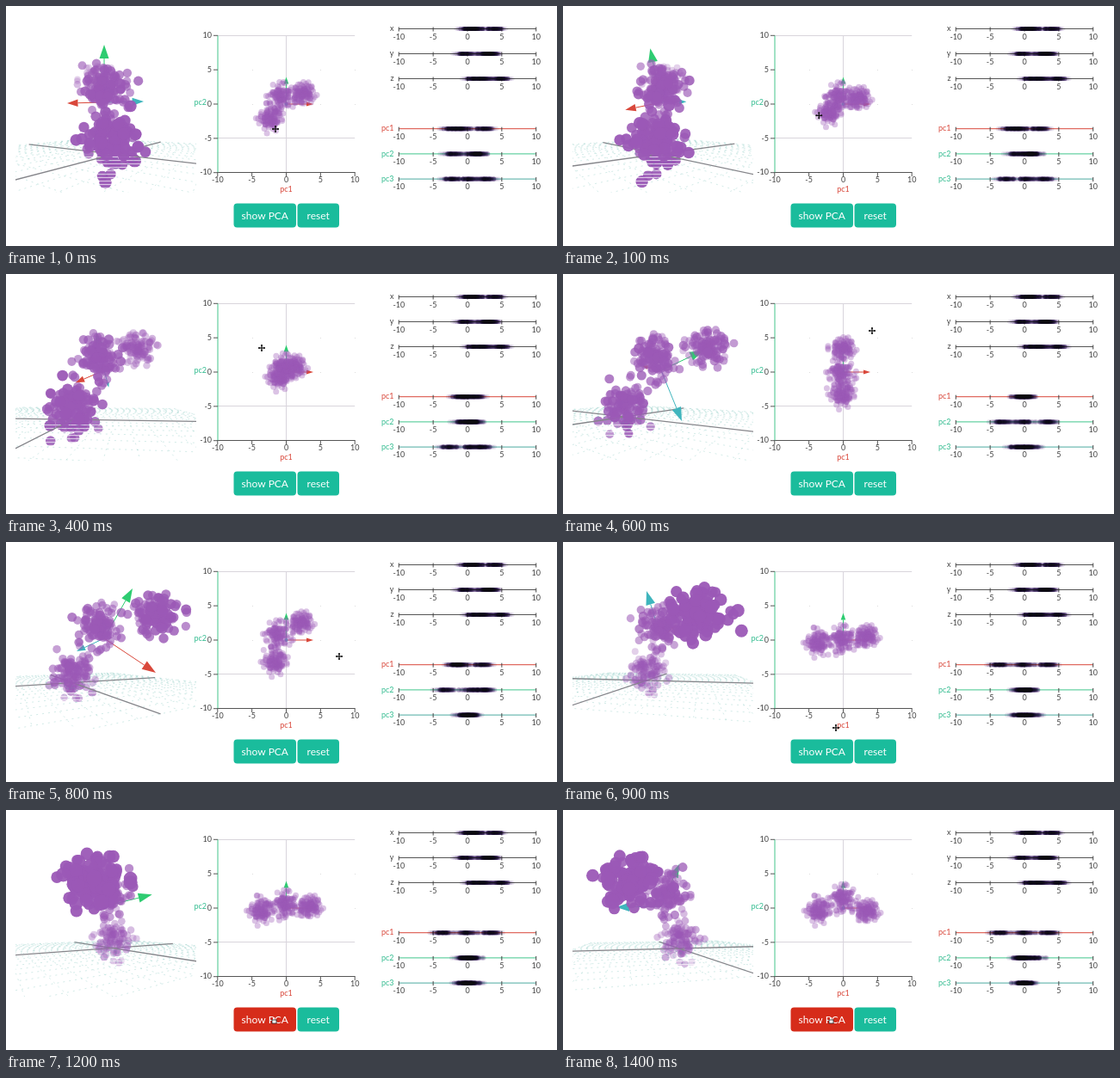
Animation of 640x279 px, one loop 1500 ms. Source, as an HTML page with a canvas:

```html
<!DOCTYPE html>
<html lang="en">
<head>
<meta charset="utf-8">
<title>Principal components</title>
<style>
  html, body { margin: 0; width: 640px; height: 279px; overflow: hidden; background: #fff; }
  canvas { display: block; }
</style>
</head>
<body>
<canvas id="stage" width="640" height="279"></canvas>
<script>
const ctx = document.getElementById('stage').getContext('2d');
const FONT = 'Lato, sans-serif';
const PURPLE = '155,89,182', DARK = '#444', GREEN = '#2ecc71', RED = '#d9483b', TEAL = '#3fb5bd';
const LOOP = 1500, STEP = 100, UNIT = 7.97, RAD = Math.PI / 180;
const CAMERA = 190, ORBIT_X = 116, HORIZON = 140, FLOOR = 25;

// Each pose: orbit angle, cursor, cluster centres (pc1, pc2, pc3), arrow tips (green, red, teal).
const poses = [
  { t: 0, turn: [-10], cursor: [313, 143], pc: [-2.2, -2.1, -2.2, -.7, 1, .2, 2.5, 1.5, 2.8],
    tips: [114, 45, 71, 113, 160, 111] },
  { t: 300, turn: [36], cursor: [266, 96], pc: [-1.3, .6, -3.4, -.2, .9, .3, 1.8, -.6, 3.3],
    tips: [76, 58, 75, 136, 110, 112] },
  { t: 600, turn: [80], cursor: [359, 66], pc: [0, -3.3, -1, -.3, -.2, .8, 0, 3.4, 0],
    tips: [163, 89, 92, 107, 138, 171] },
  { t: 800, turn: [106], cursor: [387, 133], pc: [-1.5, -3.2, .2, -1.2, .7, -.3, 2.2, 2.5, .4],
    tips: [147, 54, 174, 152, 82, 127] },
  { t: 900, turn: [148], cursor: [317, 216], pc: [-3.6, -.4, -.6, -.1, 0, .9, 3.4, .5, 0],
    tips: [125, 112, 132, 96, 97, 57] },
  { t: 1100, turn: [182], cursor: [311, 245], pc: [-3.6, -.4, -.6, -.1, 0, .9, 3.4, .5, 0],
    tips: [187, 116, 114, 100, 114, 112] },
  { t: 1400, turn: [212], cursor: [311, 245], pc: [-3.5, -.4, 0, 0, 1.3, 0, 3.5, -.5, 0],
    tips: [135, 63, 112, 104, 62, 113] }
];

// arm: signed distance from the orbit axis; xyz: centre on the fixed strips.
const clusters = [
  { arm: -43, y: 152, slope: .07, size: 13, xyz: [.2, -.4, 1] },
  { arm: -8, y: 97, slope: 0, size: 11, xyz: [1.4, 2.5, 2.4] },
  { arm: 55, y: 84, slope: -.04, size: 12.5, xyz: [4, 3.4, 4.9] }
];

let seed = 71;
function random() {
  seed = (seed * 16807) % 2147483647;
  return seed / 2147483647;
}
function gauss() {
  const g = Math.sqrt(-2 * Math.log(random())) * Math.cos(2 * Math.PI * random());
  return Math.max(-2.6, Math.min(2.6, g));
}
const points = [];
for (let i = 0; i < 330; i++) {
  points.push({ c: i % 3, off: [gauss(), gauss(), gauss()] });
}

function poseAt(t) {
  let i = 0;
  while (i < poses.length - 2 && poses[i + 1].t < t) i++;
  const a = poses[i], b = poses[i + 1], k = (t - a.t) / (b.t - a.t);
  const mix = name => a[name].map((v, j) => v + (b[name][j] - v) * k);
  return { turn: mix('turn')[0] * RAD, cursor: mix('cursor'), pc: mix('pc'), tips: mix('tips') };
}

function line(x1, y1, x2, y2, color, width = 1) {
  ctx.strokeStyle = color;
  ctx.lineWidth = width;
  ctx.beginPath();
  ctx.moveTo(x1, y1);
  ctx.lineTo(x2, y2);
  ctx.stroke();
}
function disc(x, y, r) {
  ctx.beginPath();
  ctx.arc(x, y, r, 0, 2 * Math.PI);
  ctx.fill();
}
function text(str, x, y, color, align = 'center', size = 9) {
  ctx.font = `${size}px ${FONT}`;
  ctx.textAlign = align;
  ctx.textBaseline = 'middle';
  ctx.fillStyle = color;
  ctx.fillText(str, x, y);
}
function arrow(x1, y1, x2, y2, color, head, half) {
  const len = Math.hypot(x2 - x1, y2 - y1);
  if (len < 3) return;
  const ux = (x2 - x1) / len, uy = (y2 - y1) / len;
  const bx = x2 - ux * head, by = y2 - uy * head;
  line(x1, y1, bx, by, color);
  ctx.fillStyle = color;
  ctx.beginPath();
  ctx.moveTo(x2, y2);
  ctx.lineTo(bx - uy * half, by + ux * half);
  ctx.lineTo(bx + uy * half, by - ux * half);
  ctx.fill();
}

function floorLine(x1, z1, x2, z2, color, width, dash) {
  // Keep both ends in front of the camera.
  const near = 140;
  if (z1 > near && z2 > near) return;
  if (z1 > z2) [x1, z1, x2, z2] = [x2, z2, x1, z1];
  if (z2 > near) {
    x2 = x1 + (x2 - x1) * (near - z1) / (z2 - z1);
    z2 = near;
  }
  const s1 = CAMERA / (CAMERA - z1), s2 = CAMERA / (CAMERA - z2);
  ctx.setLineDash(dash);
  line(ORBIT_X + x1 * s1, HORIZON + FLOOR * s1, ORBIT_X + x2 * s2, HORIZON + FLOOR * s2, color, width);
  ctx.setLineDash([]);
}

function drawFloor(turn) {
  const ox = -43 * Math.sin(turn), oz = 43 * Math.cos(turn), reach = 140;
  for (let side = 0; side < 2; side++) {
    const a = turn + 45 * RAD + side * Math.PI / 2;
    const ux = Math.cos(a), uz = Math.sin(a);
    for (let i = -10; i <= 10; i++) {
      const cx = ox - uz * i * 14, cz = oz + ux * i * 14;
      const ends = [cx - ux * reach, cz - uz * reach, cx + ux * reach, cz + uz * reach];
      if (i) floorLine(...ends, 'rgba(80,175,165,.36)', .7, [2, 5]);
      else floorLine(...ends, '#85858a', 1.3, []);
    }
  }
}

function drawScene(pose) {
  const sin = Math.sin(pose.turn), cos = Math.cos(pose.turn);
  const balls = points.map(({ c, off }) => {
    const k = clusters[c];
    const cz = -k.arm * cos;
    const x = k.arm * sin + k.size * (off[0] * cos - off[2] * sin);
    const z = cz + k.size * (off[0] * sin + off[2] * cos);
    const s = CAMERA / (CAMERA - z);
    return { x: ORBIT_X + x * s, y: k.y + k.slope * cz + off[1] * k.size * s, z, s,
      below: k.y + k.slope * cz + off[1] * k.size * s > HORIZON + FLOOR * s };
  }).sort((a, b) => a.z - b.z);
  const paint = below => {
    for (const b of balls) {
      if (b.below !== below) continue;
      const alpha = Math.max(.27, Math.min(.95, .62 + b.z / 130));
      ctx.fillStyle = `rgba(${PURPLE},${alpha})`;
      disc(b.x, b.y, 4.9 * b.s);
    }
  };

  ctx.save();
  ctx.beginPath();
  ctx.rect(11, 20, 210, 197);
  ctx.clip();
  paint(true);
  for (let y = 175.5; y < 217; y += 4) line(11, y, 221, y, 'rgba(255,255,255,.65)');
  drawFloor(pose.turn);
  [GREEN, RED, TEAL].forEach((color, i) => {
    const x = pose.tips[2 * i], y = pose.tips[2 * i + 1];
    const k = Math.min(1, Math.hypot(x - 114, y - 112) / 55);
    arrow(114, 112, x, y, color, 16 * k, 5.5 * k);
  });
  paint(false);
  ctx.restore();
}

function drawChart(pose) {
  const cx = 325.5, cy = 114, half = 10 * UNIT;
  const left = cx - half, right = cx + half, top = cy - half, bottom = cy + half;
  line(left, 34.5, right, 34.5, '#d9d5dc');
  line(left, 153.5, right, 153.5, '#d9d5dc');
  line(cx, top, cx, bottom, '#d9d5dc');
  ctx.fillStyle = '#ddd';
  for (const x of [-5, 5, 10]) {
    for (const y of [0, 5]) ctx.fillRect(Math.round(cx + x * UNIT), Math.round(cy - y * UNIT), 1, 1);
  }
  line(left, 193.5, right, 193.5, '#555');
  line(246, top, 246, bottom, '#45c58a');
  for (let v = -10; v <= 10; v += 5) {
    const x = cx + v * UNIT, y = cy - v * UNIT;
    line(x, 193, x, 198, '#555');
    line(241, y, 246, y, '#555');
    text(v, x, 202.5, DARK);
    text(v, 239, y, DARK, 'right');
  }
  text('pc1', cx, 213, RED);
  text('pc2', 233, 112, '#35bd91', 'right');

  arrow(cx, cy, 357, cy, RED, 8, 2.5);
  arrow(cx, cy, cx, 82.5, GREEN, 8, 2.8);
  ctx.fillStyle = TEAL;
  disc(cx, cy, 2);
  ctx.fillStyle = `rgba(${PURPLE},.36)`;
  for (const { c, off } of points) {
    const x = pose.pc[3 * c] + off[0] * .85, y = pose.pc[3 * c + 1] + off[1] * .85;
    disc(cx + x * UNIT, cy - y * UNIT, 3.5);
  }
}

function drawStrip(label, y, lineColor, textColor, valueOf) {
  const cx = 536;
  line(cx - 10 * UNIT, y, cx + 10 * UNIT, y, lineColor);
  for (let v = -10; v <= 10; v += 5) {
    const x = cx + v * UNIT;
    line(x, y - 2, x, y + 3, DARK);
    text(v, x, y + 9.5, DARK);
  }
  text(label, 450.5, y, textColor, 'right');
  ctx.save();
  ctx.globalCompositeOperation = 'multiply';
  ctx.fillStyle = 'rgba(75,30,120,.12)';
  for (const p of points) disc(cx + valueOf(p) * UNIT, y, 2.6);
  ctx.restore();
}

function drawStrips(pose) {
  ['x', 'y', 'z'].forEach((name, i) => {
    drawStrip(name, 26.5 + i * 29, '#555', DARK, p => clusters[p.c].xyz[i] + p.off[i] * .7);
  });
  const colors = [RED, '#40c58c', '#4caaa0'];
  colors.forEach((color, i) => {
    drawStrip('pc' + (i + 1), 142.7 + i * 29.2, color, i ? '#35bd91' : RED,
      p => pose.pc[3 * p.c + i] + p.off[i] * .75);
  });
}

function button(label, x, width, color) {
  ctx.fillStyle = color;
  ctx.beginPath();
  ctx.roundRect(x, 229.5, width, 28, 4);
  ctx.fill();
  text(label, x + width / 2, 244, '#fff', 'center', 12);
}

function drawCursor(x, y, hand) {
  if (hand) {
    ctx.fillStyle = '#fff';
    ctx.fillRect(x - 2, y - 1, 5, 4);
    ctx.fillRect(x - 1, y - 4, 2, 4);
    ctx.strokeStyle = '#222';
    ctx.lineWidth = .8;
    ctx.strokeRect(x - 2, y - 1, 5, 4);
    return;
  }
  line(x - 3.5, y, x + 3.5, y, '#111', 1.2);
  line(x, y - 3.5, x, y + 3.5, '#111', 1.2);
  ctx.fillStyle = '#111';
  for (const [dx, dy] of [[-3, 0], [3, 0], [0, -3], [0, 3]]) disc(x + dx, y + dy, 1);
}

function draw(t) {
  const pose = poseAt(t), hover = t >= 1000;
  ctx.fillStyle = '#fff';
  ctx.fillRect(0, 0, 640, 279);
  drawScene(pose);
  drawChart(pose);
  drawStrips(pose);
  button('show PCA', 264.5, 72.5, hover ? '#d62c1a' : '#1abc9c');
  button('reset', 338.5, 48.5, '#1abc9c');
  drawCursor(...pose.cursor, hover);
}

const start = performance.now();
function frame() {
  const t = (performance.now() - start) % LOOP;
  draw(Math.floor(t / STEP) * STEP);
  requestAnimationFrame(frame);
}
frame();
</script>
</body>
</html>
```
